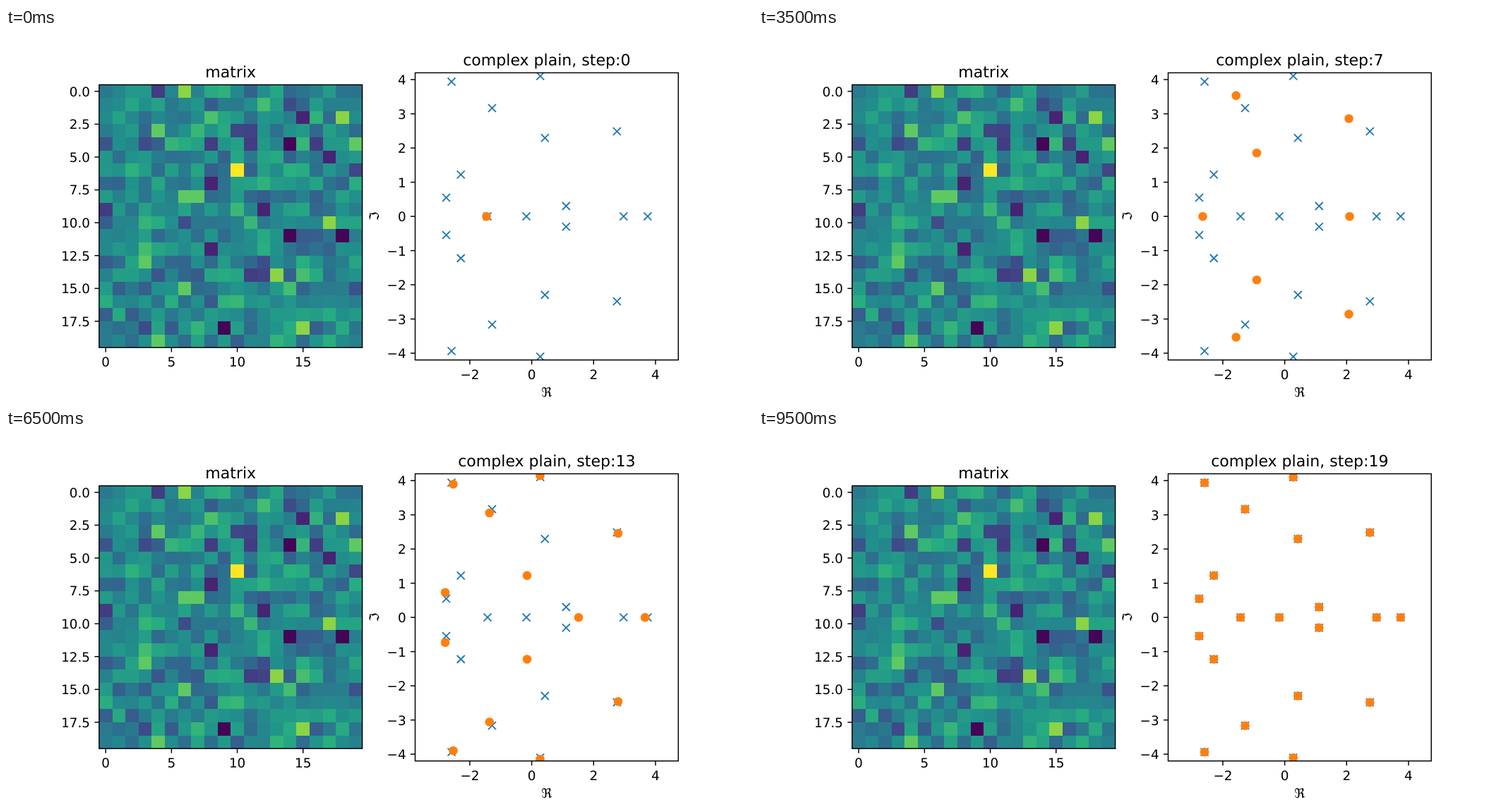
Recreate the animation shown at these times as an HTML page. Size 1058x529 px, loop 10 s.

```html
<!DOCTYPE html>
<html lang="en">
<head>
<meta charset="utf-8">
<title>Ritz values</title>
<style>
  html, body { margin: 0; width: 100%; height: 100%; overflow: hidden; background: #fff; }
  svg { display: block; width: 1058px; height: 529px; font: 18.37px "DejaVu Sans", sans-serif;
        text-rendering: geometricPrecision; }
  .title { font-size: 22.04px; }
  .mid { text-anchor: middle; }
  .end { text-anchor: end; }
  .axis { fill: none; stroke: #000; stroke-width: 1.47; }
  .cross { fill: none; stroke: #1f77b4; stroke-width: 1.84; }
  .dot { fill: #ff7f0e; }
</style>
</head>
<body>
<svg id="fig" viewBox="0 0 1058 529">
  <clipPath id="clip"><rect x="579.5" y="63.5" width="372.7" height="407.3"/></clipPath>
</svg>
<script>
const fig = document.getElementById('fig');
const STEP_MS = 500, STEPS = 20, N = 20;
const TICK = 6.43, PAD = 12.86;
const LEFT = { x: 131.9, y: 80.5, w: 372.7, h: 372.7 };
const RIGHT = { x: 579.5, y: 63.5, w: 372.7, h: 407.3 };
const ZERO_Y = 267.2;

function add(parent, tag, attrs, text) {
  const el = document.createElementNS('http://www.w3.org/2000/svg', tag);
  for (const key in attrs) el.setAttribute(key, attrs[key]);
  if (text !== undefined) el.textContent = text;
  parent.appendChild(el);
  return el;
}

// Matrix: seeded bell-shaped noise plus a few extreme cells
const EXTREMES = {
  1: [130],
  0.82: [6, 58, 217, 293, 375],
  0.75: [64, 99, 166, 167, 263, 306, 384],
  0.18: [4, 88, 91, 96, 180, 291],
  0.1: [55, 117, 148, 192, 248],
  0.01: [94, 234, 238, 369]
};
const VIRIDIS = ['440154', '472d7b', '3b528b', '2c728e', '21918c', '28ae80', '5ec962', 'addc30', 'fde725']
  .map(h => [0, 2, 4].map(i => parseInt(h.slice(i, i + 2), 16)));

function viridis(v) {
  const p = v * 8, i = Math.min(7, Math.floor(p));
  return `rgb(${VIRIDIS[i].map((c, k) => Math.round(c + (VIRIDIS[i + 1][k] - c) * (p - i)))})`;
}

let seed = 7;
function random() {
  seed = (seed * 16807) % 2147483647;
  return seed / 2147483647;
}

const cells = Array.from({ length: N * N }, () => 0.46 + 0.2 * (random() + random() + random() - 1.5));
for (const level in EXTREMES) for (const c of EXTREMES[level]) cells[c] = +level;

const pitch = LEFT.w / N;
const grid = add(fig, 'g', { 'shape-rendering': 'crispEdges' });
cells.forEach((v, i) => add(grid, 'rect', {
  x: LEFT.x + (i % N) * pitch, y: LEFT.y + Math.floor(i / N) * pitch,
  width: pitch, height: pitch, fill: viridis(v)
}));

// Key poses: conjugate pairs as [x, height above the real axis], and real points as x
const KEYS = [
  { step: 0, pairs: [], reals: [680.5] },
  { step: 4, pairs: [[672.7, 125.3], [741, 105.5]], reals: [814] },
  { step: 7, pairs: [[675.7, 171.3], [835.5, 138.7], [705, 90]], reals: [836.5, 628.5] },
  { step: 9, pairs: [[656, 167.7], [851.5, 108.3], [633.3, 110], [749.5, 197]], reals: [901, 677] },
  { step: 11, pairs: [[636, 187.5], [867.5, 119.5], [614.8, 27], [756, 203], [679.5, 144]], reals: [902.8, 784.5] },
  { step: 15, pairs: [[631, 190.5], [866.5, 119], [629.3, 44], [757, 199], [690, 152.5], [738, 59.3]],
    reals: [907.5, 837.5, 635, 771] },
  { step: 19, pairs: [[631, 191], [865.3, 120.5], [644.2, 59.3], [756.7, 199], [688.5, 153.5], [763.3, 111.3],
    [623.5, 26.5], [793.3, 14.7]], reals: [908.8, 874.7, 682, 737] }
];

const mix = (a, b, t) => a + (b - a) * t;
const mirror = ([x, h]) => [[x, ZERO_Y - h], [x, ZERO_Y + h]];

// Step k has k + 1 points: as many pairs as the next key allows, the rest real.
// Points without a predecessor appear at their next key position.
function ritz(step) {
  const next = KEYS.findIndex(k => k.step >= step);
  const to = KEYS[next], from = KEYS[Math.max(0, next - 1)];
  const t = to === from ? 1 : (step - from.step) / (to.step - from.step);
  const count = Math.min(to.pairs.length, Math.floor((step + 1) / 2));
  const pairs = to.pairs.slice(0, count).map((p, i) => {
    const old = from.pairs[i] || p;
    return p.map((v, k) => mix(old[k], v, t));
  });
  const reals = to.reals.slice(0, step + 1 - 2 * count)
    .map((x, i) => [mix(from.reals[i] ?? x, x, t), ZERO_Y]);
  return pairs.flatMap(mirror).concat(reals);
}

const plot = add(fig, 'g', { 'clip-path': 'url(#clip)' });
for (const [x, y] of ritz(STEPS - 1)) {
  add(plot, 'path', { class: 'cross', d: `M${x - 5.5} ${y - 5.5}l11 11m0 -11l-11 11` });
}
const groups = Array.from({ length: STEPS }, (_, step) => {
  const g = add(plot, 'g', { display: 'none' });
  for (const [cx, cy] of ritz(step)) add(g, 'circle', { class: 'dot', cx, cy, r: 6.3 });
  return g;
});

// Axes
function frame(box) {
  add(fig, 'rect', { class: 'axis', x: box.x, y: box.y, width: box.w, height: box.h });
}
function tickX(box, x, label) {
  const y = box.y + box.h;
  add(fig, 'path', { class: 'axis', d: `M${x} ${y}v${TICK}` });
  add(fig, 'text', { class: 'mid', x, y: y + PAD + 14 }, label);
}
function tickY(box, y, label) {
  add(fig, 'path', { class: 'axis', d: `M${box.x} ${y}h${-TICK}` });
  add(fig, 'text', { class: 'end', x: box.x - PAD, y: y + 6.9 }, label);
}
const title = (box, text) =>
  add(fig, 'text', { class: 'title mid', x: box.x + box.w / 2, y: box.y - 11 }, text);
const signed = n => (n < 0 ? '\u2212' : '') + Math.abs(n);

frame(LEFT);
frame(RIGHT);
for (let v = 0; v < N; v += 5) tickX(LEFT, LEFT.x + (v + 0.5) * pitch, v);
for (let v = 0; v < N; v += 2.5) tickY(LEFT, LEFT.y + (v + 0.5) * pitch, v.toFixed(1));
for (let v = -2; v <= 4; v += 2) tickX(RIGHT, 744.6 + v * 43.83, signed(v));
for (let v = -4; v <= 4; v++) tickY(RIGHT, ZERO_Y - v * 48.5, signed(v));
add(fig, 'text', { class: 'mid', x: 765.8, y: 523.3 }, '\u211c');
add(fig, 'text', { class: 'mid', transform: `translate(528 ${ZERO_Y}) rotate(-90)` }, '\u2111');
title(LEFT, 'matrix');
const heading = title(RIGHT, '');

let shown = -1;
function draw(now) {
  const step = Math.floor(now / STEP_MS) % STEPS;
  if (step !== shown) {
    groups.forEach((g, i) => g.setAttribute('display', i === step ? 'inline' : 'none'));
    heading.textContent = 'complex plain, step:' + step;
    shown = step;
  }
  requestAnimationFrame(draw);
}
draw(0);
</script>
</body>
</html>
```
